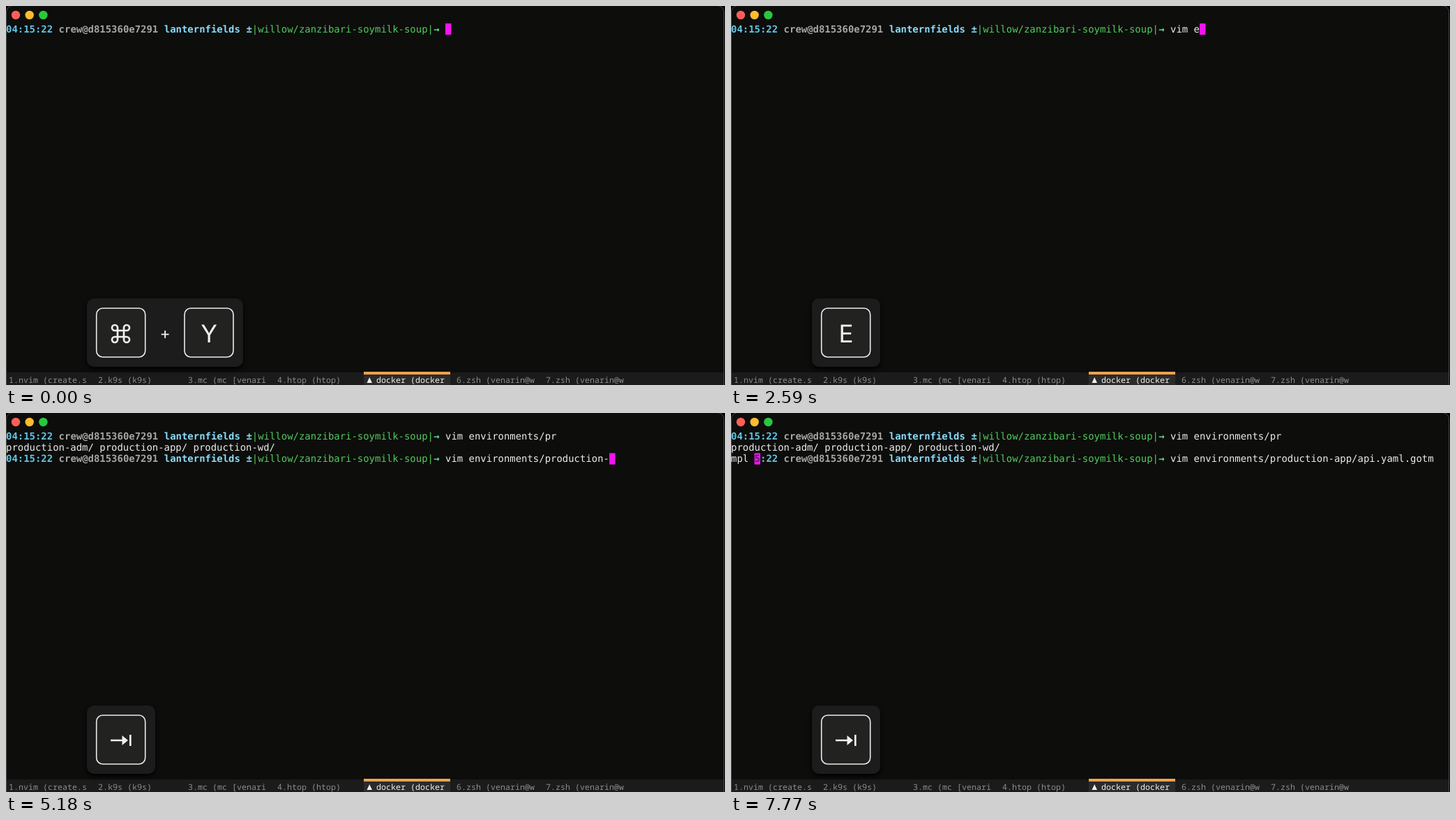
Write an HTML page that moves like this. It is 1031 by 543 pixels and loops after 8 s.

```html
<!DOCTYPE html>
<html lang="en">
<head>
<meta charset="utf-8">
<title>Terminal keystrokes</title>
<style>
html, body { margin: 0; width: 100%; height: 100%; overflow: hidden; background: #0d0d0c; }
svg { display: block; }
text { white-space: pre; text-rendering: geometricPrecision; font: 13.95px "DejaVu Sans Mono", monospace; }
.b { font-weight: 700; }
#tabs text { font: 11.667px "Noto Sans Mono", monospace; fill: #8c8c8c; }
#tabs .on { fill: #f2f2f2; font-weight: 500; }
#keys text { font: 35px Inter, sans-serif; text-anchor: middle; fill: #f0f0f0; }
#keys .plus { font-size: 23px; }
.cap { fill: #222221; stroke: #ececec; stroke-width: 1.6; }
.icon { fill: none; stroke: #f0f0f0; stroke-width: 2.7; }
#panel { fill: #1c1c1c; filter: drop-shadow(0 3px 3px #000); }
</style>
</head>
<body>
<svg width="1031" height="543" viewBox="0 0 1031 543">
  <rect width="1031" height="543" fill="#000"/>
  <rect x=".5" y="-.5" width="1029" height="560" rx="9" fill="#0d0d0c" stroke="#4a4a4a"/>
  <circle cx="14" cy="13" r="6.2" fill="#ff5f57"/>
  <circle cx="33.7" cy="13" r="6.2" fill="#febc2e"/>
  <circle cx="53.4" cy="13" r="6.2" fill="#28c840"/>
  <g id="tabs">
    <rect x="1" y="525" width="1028" height="18" fill="#1b1b1b"/>
    <rect x="513" y="525" width="124" height="18" fill="#2b2b2b"/>
    <rect x="513" y="524" width="124" height="4" fill="#eda24e"/>
    <path d="M517.5 540 L521.2 532 L525 540Z" fill="#f2f2f2"/>
  </g>
  <g id="screen"></g>
  <g id="keys">
    <rect id="panel" x="116" y="419" width="98" height="98" rx="10"/>
    <g id="caps"></g>
  </g>
</svg>
<script>
const COL = 8.4, ROW = 16.24, LOOP = 8000, START = 75;
const WHITE = '#ececec', CYAN = '#62c6e6', GREEN = '#50cc5c', SKY = '#8adcfa';
const $ = id => document.getElementById(id);

// time, key shown, command line
const steps = [
  [0, 'cmdY', ''],
  [560, 'V', 'v'],
  [770, 'I', 'vi'],
  [980, 'M', 'vim'],
  [1260, 'space', 'vim '],
  [2450, 'E', 'vim e'],
  [2660, 'N', 'vim en'],
  [2940, 'tab', 'vim environments/'],
  [3640, 'P', 'vim environments/p'],
  [3920, 'R', 'vim environments/pr'],
  [4200, 'tab', 'vim environments/production-'],
  [5250, 'A', 'vim environments/production-a'],
  [5530, 'tab', 'vim environments/production-app/'],
  [7280, 'A', 'vim environments/production-app/a'],
  [7490, 'P', 'vim environments/production-app/ap'],
  [7700, 'tab', 'vim environments/production-app/api.yaml.gotm']
];

const icons = {
  cmd: '<path class="icon" transform="translate(164.5 469.5)" d="M4.5 4.5V-8.5a4 4 0 1 1 4 4H-8.5a4 4 0 1 1 4-4V8.5a4 4 0 1 1-4-4H8.5a4 4 0 1 1-4 4z"/>',
  tab: '<path class="icon" d="M150 469H170M178.3 461V477"/><path fill="#f0f0f0" d="M166.5 462L175 469L166.5 476Z"/>',
  space: '<path class="icon" d="M152.5 475V482H176.5V475"/>'
};

const rowY = row => 37.9 + row * ROW;
const put = (col, row, str, fill, bold) =>
  `<text x="${col * COL}" y="${rowY(row)}" fill="${fill}" class="${bold ? 'b' : ''}">${str}</text>`;

function prompt(row, cmd, wrapped) {
  return (wrapped ? put(0, row, 'mpl', WHITE) + put(5, row, ':22', CYAN, true)
                  : put(0, row, '04:15:22', CYAN, true)) +
    put(9, row, 'crew@d815360e7291', '#a6a6a6', true) +
    put(27, row, 'lanternfields', SKY, true) +
    put(41, row, '±', SKY, true) +
    put(42, row, '|willow/zanzibari-soymilk-soup|', GREEN) +
    put(73, row, '→', '#5cd88c', true) +
    put(START, row, cmd, WHITE);
}

const cursor = (col, row) =>
  `<rect x="${col * COL}" y="${rowY(row) - 12.9}" width="${COL}" height="${ROW}" fill="#f414f0"/>`;

const cap = (x, label) =>
  `<rect class="cap" x="${x}" y="433" width="70" height="70" rx="9"/>` +
  (icons[label] || `<text x="${x + 35.2}" y="482">${label}</text>`);

function draw([time, key, cmd]) {
  const listed = time >= 4200, wrapped = time >= 7700, row = listed ? 2 : 0;
  let out = '';
  if (listed) {
    out += prompt(0, 'vim environments/pr') +
      put(0, 1, 'production-adm/ production-app/ production-wd/', WHITE);
  }
  out += prompt(row, cmd, wrapped) + cursor(wrapped ? 4 : START + cmd.length, row);
  if (wrapped) out += put(4, row, '5', '#5c1c74', true);
  $('screen').innerHTML = out;

  const combo = key === 'cmdY';
  $('panel').setAttribute('width', combo ? 224 : 98);
  $('caps').innerHTML = combo
    ? cap(129.7, 'cmd') + '<text class="plus" x="228" y="477">+</text>' + cap(256, 'Y')
    : cap(129.7, key);
}

const tabs = [[4, '1.nvim (create.s'], [132, '2.k9s (k9s)'], [261, '3.mc (mc [venari'], [389, '4.htop (htop)'],
  [531, 'docker (docker'], [646, '6.zsh (venarin@w'], [774, '7.zsh (venarin@w']];
$('tabs').innerHTML += tabs.map(([x, str]) =>
  `<text x="${x}" y="540.3" class="${x === 531 ? 'on' : ''}">${str}</text>`).join('');

let shown;
const begin = performance.now();
function tick() {
  const t = (performance.now() - begin) % LOOP;
  const step = steps.findLast(s => s[0] <= t);
  if (step !== shown) draw(shown = step);
  requestAnimationFrame(tick);
}
tick();
</script>
</body>
</html>
```
